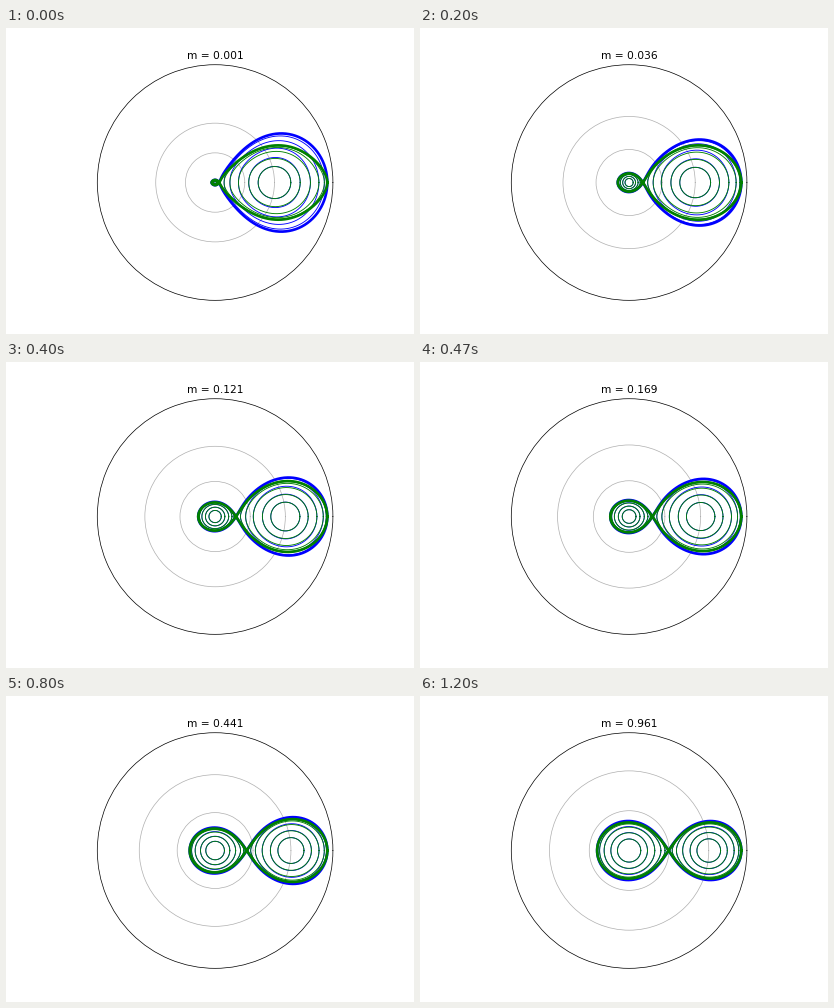
These frames come from a looping animation (408 by 306 pixels, 1270 ms). A matplotlib script:

```python
import numpy as np
import matplotlib.pyplot as plt
from matplotlib.animation import FuncAnimation

# Roche lobes of a body of mass m at the origin and a unit mass at x = 1.
# Blue: orbital plane, green: plane perpendicular to it.
LOOP_MS, TICK_MS, STEPS = 1270, 10, 19
LEVELS = (0.295, 0.465, 0.65, 0.805, 0.91, 1.0)  # share of the way to L1
PLANES = (("b", 1), ("g", 0))
ALPHA = np.linspace(0, 2 * np.pi, 361)


def mass(step):
    n = 1 + (10 * step + 5) // 6
    return 0.001 * n * n


def bisect(inside, lo, hi):
    for _ in range(45):
        mid = (lo + hi) / 2
        ok = inside(mid)
        lo, hi = np.where(ok, mid, lo), np.where(ok, hi, mid)
    return (lo + hi) / 2


def potential(m, x, y, spin):
    """Spin is 1 where y lies in the orbital plane, 0 where it is vertical."""
    pivot = 1 / (1 + m)
    turn = 0.5 * (1 + m) * ((x - pivot) ** 2 + spin * y ** 2)
    return m / np.hypot(x, y) + 1 / np.hypot(x - 1, y) + turn


def inner_point(m):
    def inside(r):
        return -m / r**2 + 1 / (1 - r) ** 2 + (1 + m) * r - 1 < 0

    return float(bisect(inside, 0.0, 1.0))


def contour(m, l1, center, share, spin):
    """Equipotential around one body, as polar angle and radius."""
    reach = share * (l1 - center)
    level = potential(m, center + reach, 0.0, spin)
    cos, sin = np.cos(ALPHA), np.sin(ALPHA)

    def inside(rho):
        return potential(m, center + rho * cos, rho * sin, spin) > level

    size = np.full_like(ALPHA, abs(reach))
    rho = bisect(inside, size * 1e-6, size)
    if center == 0:
        return ALPHA, rho
    x, y = center + rho * cos, rho * sin
    r = np.hypot(x, y)
    return y / r, r  # small-angle form


def scene(step):
    m = mass(step)
    l1 = inner_point(m)
    curves = [contour(m, l1, center, share, spin)
              for _, spin in PLANES
              for center in (0, 1)
              for share in LEVELS]
    return m, curves


scenes = [scene(step) for step in range(STEPS)]

fig = plt.figure(figsize=(6.4, 4.8), dpi=63.75)
ax = fig.add_subplot(projection="polar")
ax.set_xticks([])
ax.set_yticks([0.5, 1.0])
ax.set_yticklabels([])
title = ax.set_title("", fontsize=12, y=1.0)
lines = [ax.plot([], [], color=color, lw=3 if share == 1 else 1)[0]
         for color, _ in PLANES
         for _ in (0, 1)
         for share in LEVELS]


def update(tick):
    m, curves = scenes[(3 * tick + 1) // 20]  # 15 pictures a second
    for line, (theta, r) in zip(lines, curves):
        line.set_data(theta, r)
    ax.set_ylim(0, 1.05 * max(r.max() for _, r in curves))
    title.set_text(f"m = {m:.3f}")
    return lines


anim = FuncAnimation(fig, update, frames=LOOP_MS // TICK_MS,
                     interval=TICK_MS, repeat=True, repeat_delay=0)
plt.show()
```
